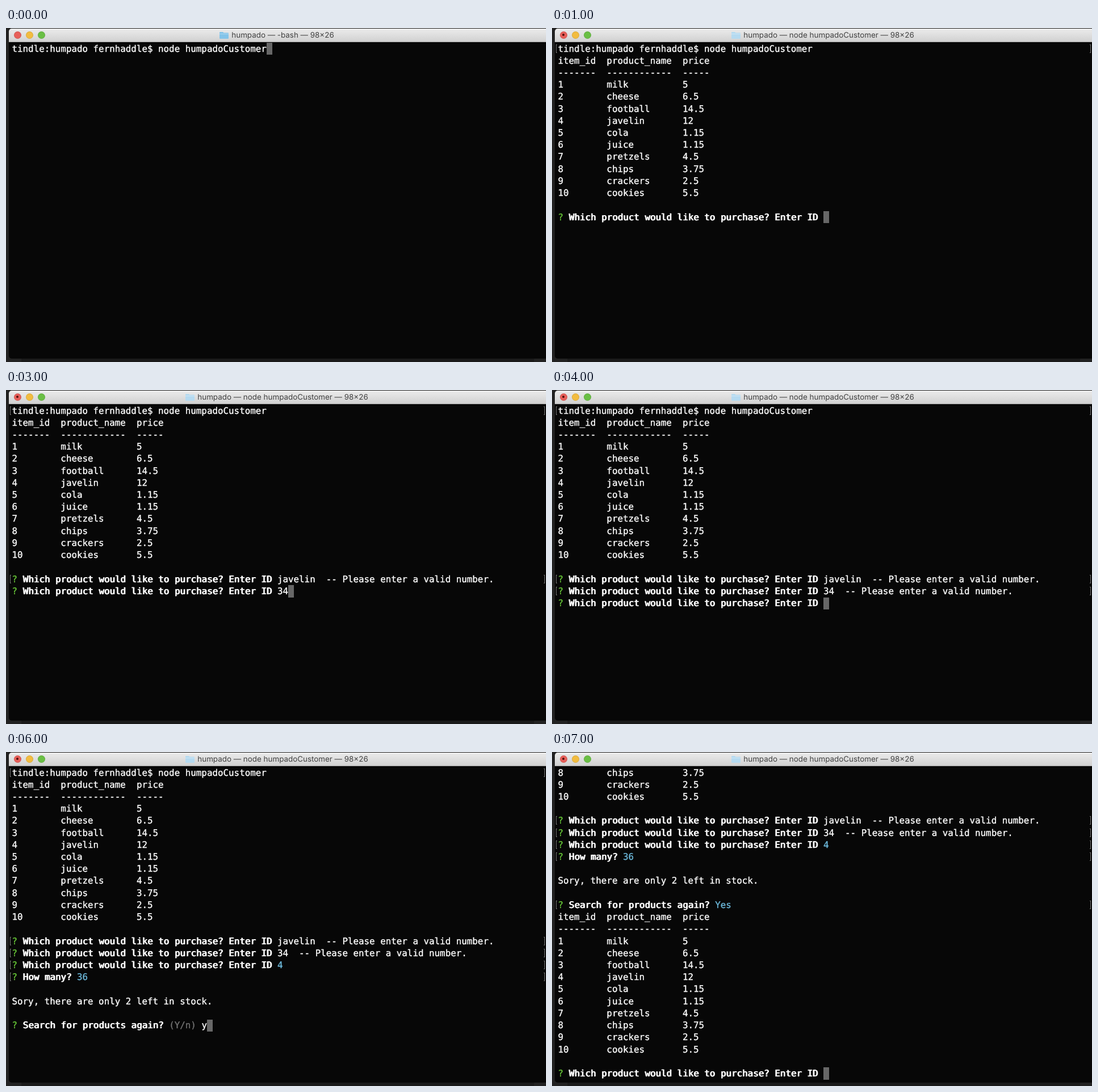
An HTML page that plays this animation: 951 by 589 pixels, repeating every 8 s.

```html
<!DOCTYPE html>
<html lang="en">
<head>
<meta charset="utf-8">
<title>Terminal</title>
<style>
html, body { margin: 0; width: 100%; height: 100%; overflow: hidden; background: #222; }
#shade { position: absolute; left: 27px; top: 583px; width: 903px; height: 6px; background: #1a1a1a; }
#window { position: absolute; left: 5px; top: 1px; width: 946px; height: 582px; background: #070707; border-radius: 5px 0 0 5px; overflow: hidden; }
#bar { height: 24px; box-sizing: border-box; background: linear-gradient(#ececec, #d1d1d1); border-bottom: 1px solid #aaa; }
.light { position: absolute; top: 4.5px; width: 13px; height: 13px; border-radius: 50%; box-shadow: inset 0 0 0 1px #0000001a; }
.busy .red::after { content: ""; position: absolute; left: 4.5px; top: 4.5px; width: 4px; height: 4px; border-radius: 50%; background: #4d0f0c; }
#title { position: absolute; left: 0; top: 0; width: 944px; height: 23px; display: flex; align-items: center; justify-content: center; gap: 5px; font: 13.4px Inter, sans-serif; color: #404040; white-space: pre; text-rendering: geometricPrecision; }
#folder { width: 16px; height: 14px; fill: #84c4e9; }
.busy #folder { fill: #b5daf0; }
#screen { position: absolute; left: 0; top: 25.5px; width: 951px; font: 15.85px/21.22px "DejaVu Sans Mono", monospace; color: #fff; white-space: pre; text-rendering: geometricPrecision; font-variant-ligatures: none; -webkit-text-stroke: .35px; }
.line { position: relative; height: 21.22px; padding-left: 10.5px; }
.done::before, .done::after { content: ""; position: absolute; top: 3px; width: 1px; height: 13px; border: 1px solid #777; }
.done::before { left: 7px; border-right: 0; }
.done::after { left: 947px; border-left: 0; }
.cursor { display: inline-block; position: relative; top: .5px; vertical-align: top; width: 10px; height: 21.22px; background: #676767; }
b { font-weight: normal; text-shadow: 1px 0 #fff; }
i { font-style: normal; color: #68c838; }
em { font-style: normal; color: #6cb8da; }
s { text-decoration: none; color: #737373; }
</style>
</head>
<body>
<div id="shade"></div>
<div id="window">
  <div id="bar">
    <div class="light red" style="left:8.5px;background:#e75f59"></div>
    <div class="light" style="left:29.5px;background:#f2bc40"></div>
    <div class="light" style="left:50.5px;background:#6abf45"></div>
  </div>
  <div id="title"><svg id="folder" viewBox="0 0 16 14"><path d="M0 2q0-1 1-1h5l1.5 1.5H15q1 0 1 1V12q0 1-1 1H1q-1 0-1-1z"/><path d="M0 4.5h16" stroke="#fff" stroke-opacity=".35"/></svg><span id="caption"></span></div>
</div>
<div id="screen"></div>
<script>
const STEP = 1000, STEPS = 8, ROWS = 26;
const get = id => document.getElementById(id);
const cursor = '<span class="cursor"></span>';
const command = 'tindle:humpado fernhaddle$ node humpadoCustomer';
const which = 'Which product would like to purchase? Enter ID';
const invalid = '  -- Please enter a valid number.';

const goods = [
  ['milk', 5], ['cheese', 6.5], ['football', 14.5], ['javelin', 12], ['cola', 1.15],
  ['juice', 1.15], ['pretzels', 4.5], ['chips', 3.75], ['crackers', 2.5], ['cookies', 5.5]
];
const columns = (id, name, price) => String(id).padEnd(9) + name.padEnd(14) + price;
const table = [
  columns('item_id', 'product_name', 'price'),
  columns('-'.repeat(7), '-'.repeat(12), '-'.repeat(5)),
  ...goods.map(([name, price], i) => columns(i + 1, name, price)),
  ''
].map(text => line(text));

function line(html, done) {
  return `<div class="line${done ? ' done' : ''}">${html}</div>`;
}

function transcript(step) {
  const lines = [];
  // A question appears at `from` and is answered at `until`.
  const ask = (from, until, question, typed, answer) => {
    if (step < from) return;
    const done = step >= until;
    lines.push(line(`<i>?</i> <b>${question}</b> ` + (done ? answer : typed + cursor), done));
  };
  lines.push(line(command + (step ? '' : cursor), step > 0));
  if (step >= 1) lines.push(...table);
  ask(1, 3, which, step > 1 ? 'javelin' : '', 'javelin' + invalid);
  ask(3, 4, which, '34', '34' + invalid);
  ask(4, 5, which, '', '<em>4</em>');
  ask(5, 6, 'How many?', '36', '<em>36</em>');
  if (step >= 6) lines.push(line(''), line('Sory, there are only 2 left in stock.'), line(''));
  ask(6, 7, 'Search for products again?', '<s>(Y/n)</s> y', '<em>Yes</em>');
  if (step >= 7) lines.push(...table);
  ask(7, 8, which, '', '');
  return lines.slice(-ROWS).join('');
}

let shown = -1;
function draw() {
  const step = Math.floor(performance.now() / STEP) % STEPS;
  if (step !== shown) {
    shown = step;
    get('window').className = step ? 'busy' : '';
    get('caption').textContent = `humpado — ${step ? 'node humpadoCustomer' : '-bash'} — 98×26`;
    get('screen').innerHTML = transcript(step);
  }
  requestAnimationFrame(draw);
}
draw();
</script>
</body>
</html>
```
